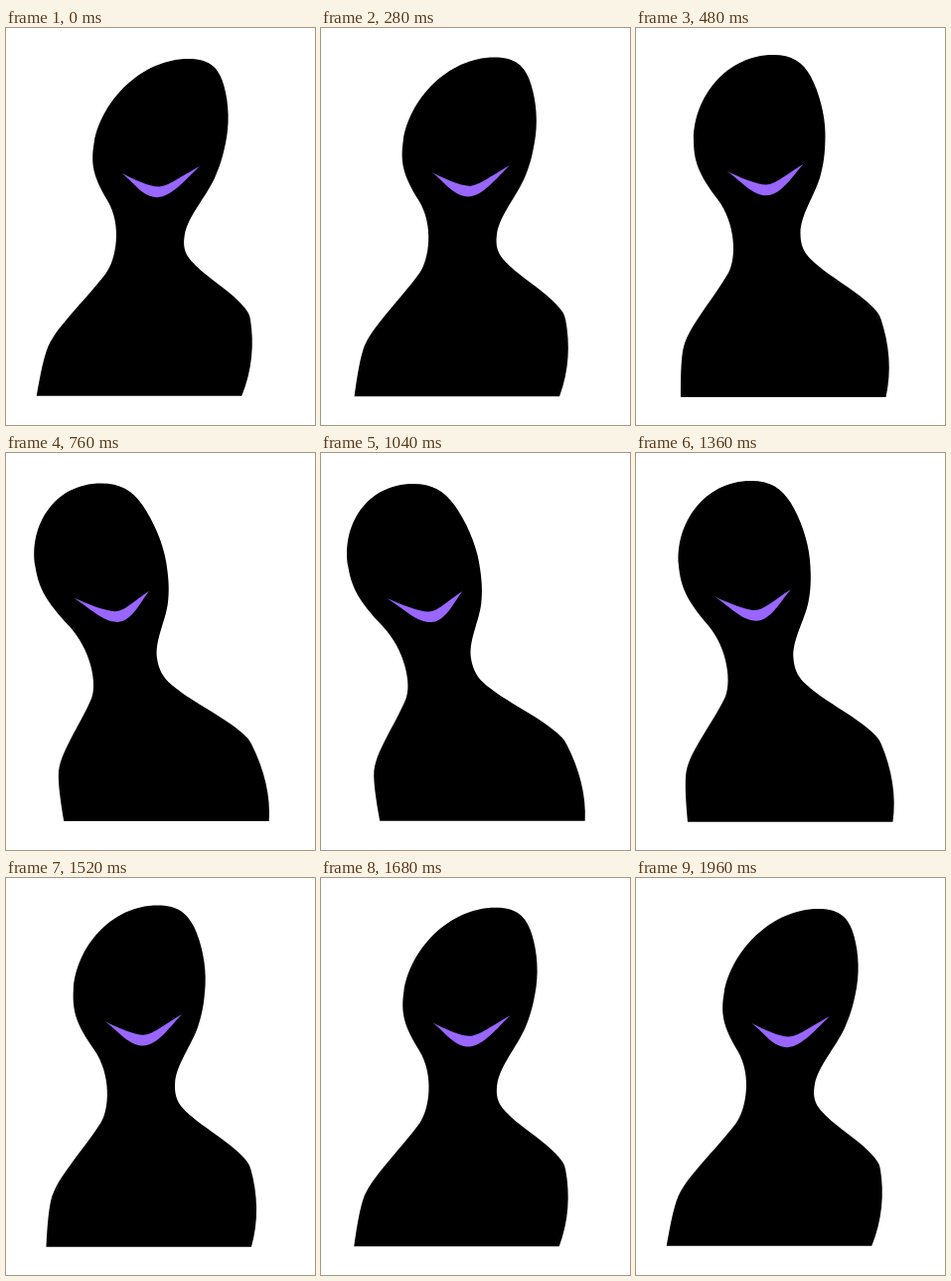
Animation of 311x399 px, one loop 2 s. Source, as an HTML page with a canvas:

```html
<!DOCTYPE html>
<html lang="en">
<head>
<meta charset="utf-8">
<title>Swaying figure</title>
<style>
html, body { margin: 0; width: 100%; height: 100%; overflow: hidden; background: #fff; }
canvas { display: block; width: 311px; height: 399px; }
</style>
</head>
<body>
<canvas id="stage" width="311" height="399"></canvas>
<script>
const ctx = document.getElementById('stage').getContext('2d');

const LOOP = 2000, STEP = 40;      // ms
const OUT = 960, BACK = 1000;      // sway to the left, then back
const LEAN = 10 * Math.PI / 180;   // largest lean to either side
const PIVOT = 289;                 // height that stays still

// The upright figure: left side up, over the head, right side down.
const body = new Path2D(`M45 371
  C45 355 45 338 47 325 S57 300 65 288 S85 260 93 246
  S101 197 82 172 S58 134 58 112
  C58 70 91 27 138 27
  C157 27 168 34 176 49 S190.5 87 190.5 107 S188.5 138 185.5 149
  C180 168 165.5 188 165.5 206 S173 230 184 239.5
  S217 262 230 273 S245 288 246.5 292.5
  C255 318 257.5 345 251.5 371 Z`);

const mouth = new Path2D(`M91.5 143.7
  C104 150 122 157.5 131 157.5 S150 148 168.6 136.8
  C158 148 146 168.3 131.5 168.3 S106 154 91.5 143.7 Z`);

const clamp = u => Math.min(1, Math.max(0, u));
const ease = u => u < 0.5 ? 4 * u ** 3 : 1 - 4 * (1 - u) ** 3;

// 0 is fully right, 1 is fully left.
function sway(t) {
  return ease(clamp(t / OUT)) - ease(clamp((t - OUT) / BACK));
}

// Slant about the pivot, keeping the length of the upright axis.
function lean(angle) {
  const s = Math.sin(angle), c = Math.cos(angle);
  ctx.setTransform(1, 0, -s, c, s * PIVOT, (1 - c) * PIVOT);
}

function draw(time) {
  const t = Math.floor((time % LOOP) / STEP) * STEP;
  ctx.resetTransform();
  ctx.fillStyle = '#fff';
  ctx.fillRect(0, 0, 311, 399);
  lean(LEAN * (1 - 2 * sway(t)));
  ctx.fillStyle = '#000';
  ctx.fill(body);
  ctx.fillStyle = '#9966ff';
  ctx.fill(mouth);
}

const start = performance.now();
function tick() {
  draw(performance.now() - start);
  requestAnimationFrame(tick);
}
tick();
</script>
</body>
</html>
```
